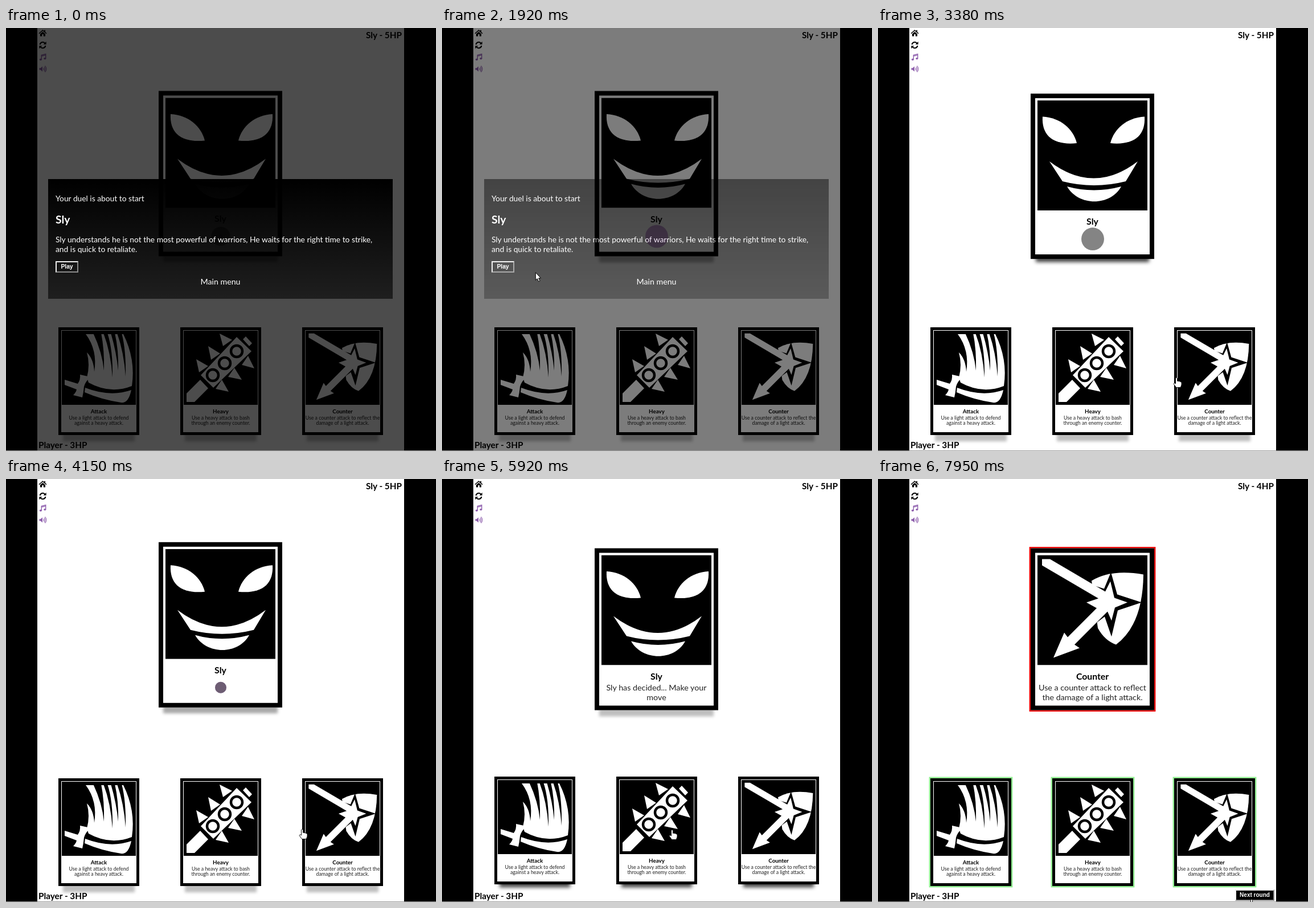
Animation of 755x742 px, one loop 8000 ms. Source, as an HTML page:

```html
<!DOCTYPE html>
<html lang="en">
<head>
<meta charset="utf-8">
<title>Card duel</title>
<style>
html, body { margin: 0; width: 100%; height: 100%; overflow: hidden; background: #000; }
body { position: relative; font: 13.8px/20px Lato, sans-serif; color: #000; }
body *, body > svg { position: absolute; box-sizing: border-box; white-space: nowrap; }
svg *, br { position: static; }
p { margin: 0; }
#table { left: 55px; top: 0; width: 644px; height: 741px; background: #fff; }
#edge { left: 0; top: 741px; width: 755px; height: 1px; background: #999; }
#icons { left: 0; top: 0; }
.hp { font-size: 15.3px; font-weight: 700; }
.card { background: #fff; border: solid #000; }
.card p { left: -20px; right: -20px; text-align: center; }
.card .name { font-weight: 700; }
.card .text { white-space: pre; color: #222; }
.big { left: 268px; top: 0; width: 217px; border-width: 8px; }
.big svg { left: 4px; top: 4px; width: 193px; height: 193px; }
.big .name { top: 206px; font-size: 15.8px; }
.big .text { top: 227px; font-size: 14.3px; line-height: 17px; }
.small { top: 0; width: 142px; height: 189px; border-width: 5px; }
.small svg { left: 1px; top: 1px; width: 130px; height: 130px; }
.small .name { top: 132px; font-size: 9.8px; }
.small .text { top: 150px; font-size: 8.75px; line-height: 8.7px; }
.dot { left: 80.5px; top: 227px; width: 40px; height: 40px; border-radius: 50%; opacity: .6; }
#overlay { left: 55px; top: 0; width: 644px; height: 741px; background: rgba(0,0,0,.7); }
#dialog { left: 19px; top: 265px; width: 605px; height: 210px; color: #fff;
  background: linear-gradient(#000, rgba(0,0,0,.6)); }
#dialog p { left: 13px; }
.button { border: 2px solid; border-color: #eee #8a8a8a #8a8a8a #eee; color: #fff; background: #000;
  text-align: center; font: 700 10.3px/16px "Liberation Sans", Arial, sans-serif; }
#play { left: 13px; top: 144px; width: 40px; height: 20px; background: none; }
#play.hover { transform: scale(.95); border-color: #bbb #999 #999 #bbb; }
#next { left: 627px; top: 720px; width: 69px; height: 20px; font-size: 10px; }
#cursor { left: 0; top: 0; width: 30px; height: 30px; overflow: visible; }
</style>
</head>
<body>
<div id="table"></div>
<div id="edge"></div>
<svg id="icons" width="90" height="90">
  <path d="M57.5 9.3 64.5 3l2.5 2.2V3.8h2v3.3l2.5 2.2-1 1-6-5.3-6 5.3ZM60 10.4l4.5-4 4.5 4V14.5h-3.2V11h-2.6v3.5H60Z"/>
  <g id="arc"><path d="M59.6 29a5 5 0 0 1 9-2" fill="none" stroke="#000" stroke-width="2"/><path d="M70.6 23.8v5h-5Z"/></g>
  <use href="#arc" transform="rotate(180 64.5 30)"/>
  <g fill="#8e5fad" stroke="#8e5fad">
    <path d="M62.3 55V47.6l7.4-2v7.8M62.3 49.4l7.4-2" fill="none" stroke-width="1.4"/>
    <ellipse cx="60.9" cy="55.3" rx="1.7" ry="1.2"/><ellipse cx="68.3" cy="53.6" rx="1.7" ry="1.2"/>
    <path d="M58.5 70.2h2.3l3.2-3v9.4l-3.2-3h-2.3Z" stroke="none"/>
    <path d="M65.7 70q1.6 2 0 4M67 68q3.2 4 0 8M68.5 66.3q4.6 5.5 0 11" fill="none" stroke-width="1.1"/>
  </g>
</svg>
<p class="hp" id="enemyHp" style="right:calc(100% - 695px);top:2px"></p>
<p class="hp" style="left:57px;top:721px">Player - 3HP</p>
<div id="cards"></div>
<div class="button" id="next">Next round</div>
<div id="overlay">
  <div id="dialog">
    <p style="top:24px">Your duel is about to start</p>
    <p style="top:61px;font-size:19.3px;font-weight:700">Sly</p>
    <p style="top:97px;line-height:17px">Sly understands he is not the most powerful of warriors, He waits for the right time to strike,<br>and is quick to retaliate.</p>
    <div class="button" id="play">Play</div>
    <p style="top:170px;left:0;width:605px;text-align:center;font-size:14.2px">Main menu</p>
  </div>
</div>
<svg id="cursor">
  <path id="arrow" d="M0 0V13.5L3 10.8 5.2 15.8 7.5 14.8 5.3 10H9.3Z" fill="#fff" stroke="#000"/>
  <path id="hand" d="M-1.5 1.5Q0-.8 1.5 1.5V6.5Q3 5.2 4 7 5.5 5.8 6.5 7.6 9 6.8 9 9.5V13L7.3 17.5H-.5L-4.8 11.5Q-4.5 8.5-1.5 11Z" fill="#fff" stroke="#000" stroke-width=".9"/>
</svg>
<script>
const $ = id => document.getElementById(id);

const art = {
  Sly: [193, `<path id="eye" d="M9 28.5C40 30 63 50 69 75 28 79 7 62 9 28.5Z"/>
    <use href="#eye" transform="matrix(-1 0 0 1 197 0)"/>
    <path d="M21 107Q99 166 176 107L155 142Q99 156 44 142ZM52 151Q99 164 147 151C128 186 72 186 52 151Z"/>`],
  Counter: [193, `<path d="M95 45Q130 24 186 34 185 122 138 157 118 150 106 128Z"/>
    <path fill="#000" d="M129 30 140 69 183 83 141 97 130 143 118 108 95 125 75 83 88 50 117 59Z"/>
    <path d="M8 7H22L119 64 128 46 135 75 158 83 136 92 130 115 123 99 65 157 74 163 28 180 47 136 53 144 104 93 86 83 107 76 8 18Z"/>`],
  Heavy: [130, `<path d="M5 110 29 86 43 101 19 125H5ZM30 78 93 11 119 36 52 100ZM104 15 109 10 120 22 115 27Z"/>
    <path id="spikes" d="M22 50 43 62 27 73ZM43 27 64 40 48 51ZM63 5 85 16 69 27Z"/>
    <use href="#spikes" transform="matrix(0 -1 -1 0 129 129)"/>` +
    [51, 72, 93].map(x => `<circle cx="${x}" cy="${129 - x}" r="10" stroke="#000" stroke-width="4.5"/>`).join("")],
  Attack: [130, `<path d="M42 6H108Q130 50 123 97 85 112 47 91L44 82Q50 60 44 38 56 50 57 72 63 34 42 6Z"/>
    <g fill="#000">` + [[55, 69, 74, 70], [73, 80, 89, 82], [86, 93, 99, 70], [97, 105, 112, 80]].map(([a, b, x, y]) =>
      `<path d="M${a} 4Q${x - 3} 38 ${x} ${y} ${x + 1} 34 ${b} 4Z"/>`).join("") + `</g>
    <path d="M41 100Q85 117 122 104 117 128 104 126 70 121 40 108Z"/>
    <path d="M32 77 50 81Q41 90 39 98 38 109 36 117L20 113Q25 108 26 103L5 95V86L28 93Q33 86 32 77Z"/>`]
};
const texts = {
  Sly: "Sly has decided... Make your\nmove",
  Attack: "Use a light attack to defend\nagainst a heavy attack.",
  Heavy: "Use a heavy attack to bash\nthrough an enemy counter.",
  Counter: "Use a counter attack to reflect the\ndamage of a light attack."
};

function addCard(name, kind, text = texts[name]) {
  const [size, shapes] = art[name];
  const card = document.createElement("div");
  card.className = "card " + kind;
  card.innerHTML = `<svg viewBox="0 0 ${size} ${size}" fill="#fff"><rect width="${size}" height="${size}" fill="#000"/>${shapes}</svg>
    <p class="name">${name}</p><p class="text">${text}</p>`;
  $("cards").append(card);
  return card;
}

const sly = addCard("Sly", "big");
const slyText = sly.querySelector(".text");
sly.insertAdjacentHTML("beforeend", '<i class="dot" style="background:#9b59b6"></i><i class="dot" style="background:#333"></i>');
const dots = sly.querySelectorAll(".dot");
const reveal = addCard("Counter", "big", "Use a counter attack to reflect\nthe damage of a light attack.");
const hand = ["Attack", "Heavy", "Counter"].map((name, i) => {
  const card = addCard(name, "small");
  card.style.left = 92 + 214 * i + "px";
  return card;
});

const LOOP = 8000, DECIDED = 4340, RESOLVED = 7000;
const BIG_Y = 121.5, BIG_HEIGHT = 283.5, SMALL_Y = 525;
// time, x, y
const path = [
  [70, 648, 742], [820, 142, 428], [950, 113, 421], [1720, 113, 421], [2480, 428, 469], [2560, 428, 469],
  [3380, 524, 613], [3800, 527, 619], [4150, 520, 614], [4920, 542, 610], [5800, 404, 615],
  [6250, 404, 615], [6750, 374, 499], [7660, 371, 503], [7930, 656, 737], [8000, 656, 737]
];
const lerp = (a, b, k) => a + (b - a) * k;
const clamp = v => Math.min(1, Math.max(0, v));
const smooth = k => (1 - Math.cos(Math.PI * k)) / 2;

function cursorAt(t) {
  const i = Math.max(1, path.findIndex(p => p[0] > t));
  const [a, b] = [path[i - 1], path[i]];
  const k = smooth(clamp((t - a[0]) / (b[0] - a[0])));
  return [lerp(a[1], b[1], k), lerp(a[2], b[2], k)];
}

const RESTING = "0 19px 5px -8px rgba(0,0,0,.25)";
const outline = color => `0 0 0 2.4px ${color}`;
function place(card, y, shadow) {
  card.style.transform = `translateY(${y}px)`;
  card.style.boxShadow = shadow;
}
// lift: 0 is low with a dark tight shadow, 1 is high with a pale one
function float(card, low, high, lift) {
  const mix = (a, b) => lerp(a, b, lift).toFixed(2);
  place(card, lerp(low, high, lift),
    `0 ${mix(14, 18.5)}px ${mix(7, 5)}px ${mix(-10, -8)}px rgba(0,0,0,${mix(.95, .3)})`);
}
const show = (el, on) => { el.style.display = on ? "" : "none"; };

function draw(t) {
  const decided = t >= DECIDED, resolved = t >= RESOLVED;

  show(sly, !resolved);
  show(reveal, resolved);
  show(slyText, decided);
  sly.style.height = (decided ? BIG_HEIGHT : 290) + "px";
  if (decided) place(sly, BIG_Y, RESTING);
  else float(sly, 117.3, 110.4, smooth(t / 1000 + 1));
  reveal.style.height = BIG_HEIGHT + "px";
  place(reveal, BIG_Y, outline("#f00000"));

  const pulse = .5 + .5 * Math.sin(Math.PI * (t - 4150) / 1500);
  dots.forEach((dot, i) => {
    show(dot, !decided);
    dot.style.transform = `scale(${i ? 1 - pulse : pulse})`;
  });

  for (const card of hand) {
    if (resolved) place(card, SMALL_Y, outline("#90ee90"));
    else if (decided) float(card, SMALL_Y, SMALL_Y - 8, smooth((t - DECIDED) / 1000));
    else place(card, SMALL_Y, RESTING);
  }

  $("enemyHp").textContent = `Sly - ${resolved ? 4 : 5}HP`;
  show($("next"), resolved);
  $("overlay").style.opacity = 1 - clamp((t - 1760) / 600);

  const [x, y] = cursorAt(t);
  const onPlay = t < 1800 && x > 86 && x < 128 && y > 408 && y < 430;
  const onCard = t > 2500 && y > 526 && y < 714 && (x - 92 + 214) % 214 < 142;
  const onNext = resolved && x > 627 && y > 720;
  const pointing = onPlay || onCard || onNext;
  $("play").className = onPlay ? "button hover" : "button";
  show($("cursor"), t >= 70);
  show($("hand"), pointing);
  show($("arrow"), !pointing);
  $("cursor").style.transform = `translate(${x}px,${y}px)`;
}

function tick() {
  draw(performance.now() % LOOP);
  requestAnimationFrame(tick);
}
tick();
</script>
</body>
</html>
```
